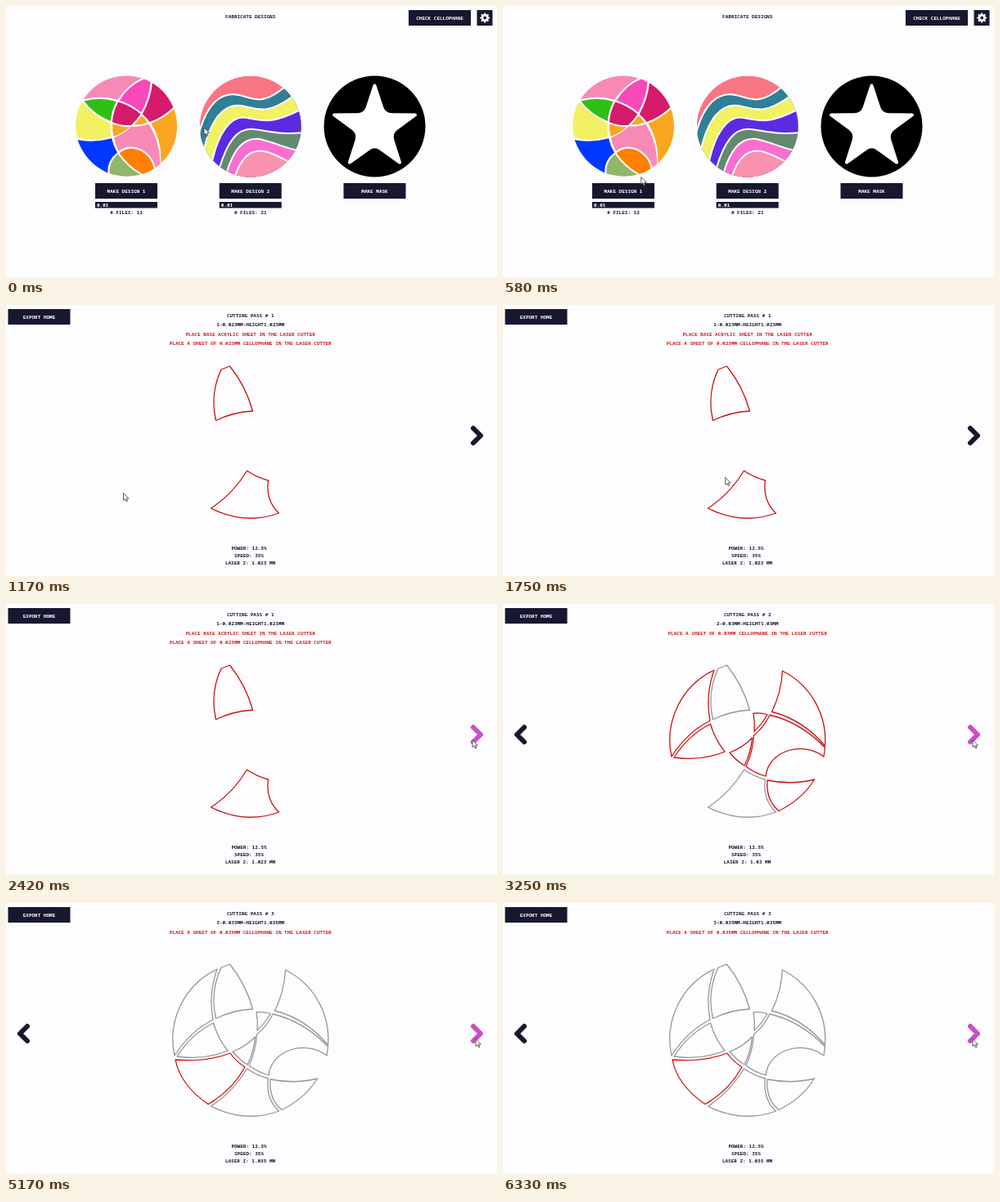
Animation of 600 by 332 pixels, one loop 6410 ms. Source, as an HTML page:

```html
<!DOCTYPE html>
<html lang="en">
<head>
<meta charset="utf-8">
<title>Fabricate designs</title>
<style>
  html, body { margin: 0; width: 100%; height: 100%; overflow: hidden; background: #fdfcfe; }
  svg { display: block; width: 600px; height: 332px; }
  text { font: 600 6px "Noto Sans Mono", "DejaVu Sans Mono", monospace; fill: #17172f; text-anchor: middle; white-space: pre; }
  .light { fill: #fff; }
  .warn { fill: #c8201c; }
  .start { text-anchor: start; }
  .cut { fill: none; stroke: #c81410; stroke-width: 1.3; stroke-linejoin: round; }
  .done { stroke: #989498; }
  .chevron { fill: none; stroke: #17172f; stroke-width: 6; stroke-linecap: round; stroke-linejoin: round; }
</style>
</head>
<body>
<svg id="stage" viewBox="0 0 600 332"></svg>
<script>
const LOOP = 6410;
const DARK = '#17172f', PINK = '#f36cf0', ORCHID = '#c850c8';
const stage = document.getElementById('stage');

const text = (x, y, s, cls = '') => `<text x="${x}" y="${y}" class="${cls}">${s}</text>`;
const rect = (x, y, w, h, extra = '') =>
  `<rect x="${x}" y="${y}" width="${w}" height="${h}" fill="${DARK}" ${extra}/>`;
const button = (x, y, label, id = '') =>
  rect(x, y, 76, 19, id && `id="${id}"`) + text(x + 38, y + 11.8, label, 'light');
const path = (d, attrs) => `<path d="${d}" ${attrs}/>`;
const disc = (x, fill) => `<circle cx="${x}" cy="147.5" r="62" fill="${fill}"/>`;
const clip = (id, x) => `<clipPath id="${id}">${disc(x, '#000')}</clipPath>`;

// Pieces of the first design, grouped by cutting pass: [colour, outline].
const cuts = [
  [
    ['#f74ab8', 'M263,79L273.5,75Q293,99 301.5,130Q278,131 256.5,141.5Q249,109 263,79Z'],
    ['#0038ff', 'M294.5,203Q306,211 320.5,215Q317,239 333.5,255Q292,270 250.5,249Q277,232 294.5,203Z']
  ],
  [
    ['#f78ab5', 'M258,81A95,95 0 0 0 206,187Q225,157 253,143Q247,112 258,81Z'],
    ['#2fc016', 'M209,188Q227,160 253.5,147Q259,166 271,181Q240,193 209,188Z'],
    ['#faa61f', 'M277,182Q293,176 304.5,164Q303,182 295,198Q284,191 277,182Z'],
    ['#faa61f', 'M306,134Q315,133 323,135.5Q316,148 307,156Q308,145 306,134Z'],
    ['#faa61f', 'M341.5,82A95,95 0 0 1 393.5,174Q367,142 328.5,132Q340,109 341.5,82Z'],
    ['#f78ab5', 'M326,136Q364,145 393.5,176L392,187C368,168 325,178 321,211Q307,207 297,199Q305,182 306.5,161Q318,152 326,136Z'],
    ['#92b56a', 'M323,216Q353,222 380.5,215Q366,239 337,253.5Q321,240 323,216Z']
  ],
  [['#f1f163', 'M207,192Q245,195 274,184Q281,194 292,201Q276,230 247,246.5Q213,223 207,192Z']]
];
const uncut = [
  ['#d61a6c', 'M278,75A95,95 0 0 1 338,81Q337,108 325,132Q315,130 305,130.5Q297,99 278,75Z'],
  ['#d61a6c', 'M256.5,145Q278,134 302.5,133Q305,147 304,160Q292,173 274.5,180Q262,165 256.5,145Z'],
  ['#ff8000', 'M324,213C328,182 366,172 391,190Q389,202 382,212Q352,219 324,213Z']
];

const ball = () => clip('ballClip', 147) + '<g clip-path="url(#ballClip)">' + disc(147, '#fff') +
  '<g transform="translate(147 147.5) rotate(43.5) scale(.655) translate(-299 -168)">' +
  [...cuts.flat(), ...uncut].map(([c, d]) => path(d, `fill="${c}"`)).join('') + '</g></g>';

// Wavy bands, each one covering the lower part of the one before.
function waves() {
  const bands = [
    ['#2f7f96', '237,152C247,118 264,105 284,109C304,113 312,123 341,99'],
    ['#f1f163', '242,175C250,140 266,119 287,122C308,126 318,134 350,111'],
    ['#5a2be0', '252,190C259,158 274,133 294,137C314,141 324,145 360,127'],
    ['#64896f', '261,198C270,168 282,149 302,151C322,153 336,158 363,155'],
    ['#f86fd0', '270,203C278,176 290,160 310,163C328,167 340,174 357,177'],
    ['#f892ad', '280,208C288,184 300,175 316,178C328,181 336,186 346,191']
  ];
  return clip('waveClip', 298.7) + '<g clip-path="url(#waveClip)">' + disc(298.7, '#f87585') +
    bands.map(([c, d]) => path(`M230,220L${d}H375V220Z`,
      `fill="${c}" stroke="#fff" stroke-width="2"`)).join('') + '</g>';
}

function star() {
  const at = (r, deg) => [450.5 + r * Math.cos(deg * Math.PI / 180), 149.5 + r * Math.sin(deg * Math.PI / 180)];
  const mix = (a, b, k) => a.map((v, i) => v + (b[i] - v) * k);
  let d = '';
  for (let i = 0; i < 5; i++) {
    const deg = i * 72 - 90;
    const tip = at(52, deg), inner = at(20, deg + 36), next = at(52, deg + 72);
    d += `${i ? 'L' : 'M'}${tip}L${mix(inner, tip, .25)}Q${inner} ${mix(inner, next, .25)}`;
  }
  return disc(450.5, '#000') +
    path(d + 'Z', 'fill="#fff" stroke="#fff" stroke-width="4" stroke-linejoin="round"');
}

function gear() {
  return rect(575.5, 5, 19, 19) +
    '<circle cx="585.2" cy="14.5" r="3.3" fill="none" stroke="#fff" stroke-width="2.8"/>' +
    '<circle cx="585.2" cy="14.5" r="5" fill="none" stroke="#fff" stroke-width="2" pathLength="16" stroke-dasharray="1" stroke-dashoffset=".5"/>';
}

const progress = (x, files) => rect(x, 240, 76, 7.5) +
  text(x + 2, 246, '0.01', 'light start') + text(x + 38, 255.2, `# FILES: ${files}`);

const home = text(298.7, 14.8, 'FABRICATE DESIGNS') +
  button(492, 5, 'CHECK CELLOPHANE') + gear() + ball() + waves() + star() +
  button(109, 217, 'MAKE DESIGN 1', 'make') + button(260.7, 217, 'MAKE DESIGN 2') +
  button(412.5, 217, 'MAKE MASK') + progress(109, 12) + progress(260.7, 21);

function pass(n) {
  const mm = ['0.023', '0.03', '0.035'][n - 1], z = '1' + mm.slice(1);
  const sheet = `PLACE A SHEET OF ${mm}MM CELLOPHANE IN THE LASER CUTTER`;
  const notes = n === 1 ? ['PLACE BASE ACRYLIC SHEET IN THE LASER CUTTER', sheet] : [sheet];
  return button(2.5, 5, 'EXPORT HOME') +
    text(298.7, 14.8, `CUTTING PASS # ${n}`) +
    text(298.7, 26.2, `${n}-${mm}MM-HEIGHT${z}MM`) +
    notes.map((s, i) => text(298.7, 37.6 + i * 11.4, s, 'warn')).join('') +
    cuts.slice(0, n).map((group, i) => group.map(([, d]) =>
      path(d, `class="cut${i < n - 1 ? ' done' : ''}"`)).join('')).join('') +
    ['POWER: 12.5%', 'SPEED: 35%', `LASER Z: ${z} MM`].map((s, i) =>
      text(297 + (i === 2) * 1.5, 300.2 + i * 8.7, s)).join('') +
    (n > 1 ? path('M26,151L17,160L26,169', 'class="chevron"') : '') +
    path('M571,151L580,160L571,169', 'class="chevron next"');
}

const screens = [home, pass(1), pass(2), pass(3)];
stage.innerHTML = '<rect width="600" height="332" fill="#fdfcfe"/>' +
  screens.map(s => `<g class="screen">${s}</g>`).join('') +
  path('M0,0V9L2.1,7.2L3.6,10.4L5,9.7L3.6,6.7H6.4Z',
    'id="cursor" fill="#fff" stroke="#33333b" stroke-width=".8" stroke-linejoin="round"');

const groups = [...stage.querySelectorAll('.screen')];
const nextArrows = [...stage.querySelectorAll('.next')];
const make = document.getElementById('make');
const cursor = document.getElementById('cursor');

const switches = [0, 1170, 3080, 4500];
// time, x, y
const track = [
  [0, 242, 149], [80, 242, 149], [830, 143.5, 230.5], [1420, 143.5, 230.5],
  [2330, 570, 166.5], [2420, 570, 166.5], [2670, 574, 166.5], [LOOP, 574, 166.5]
];

function pointer(t) {
  const i = track.findIndex(p => p[0] > t);
  const [t0, x0, y0] = track[i - 1], [t1, x1, y1] = track[i];
  const k = (t - t0) / (t1 - t0), e = k * k * (3 - 2 * k);
  return [x0 + (x1 - x0) * e, y0 + (y1 - y0) * e];
}

function draw() {
  const t = performance.now() % LOOP;
  const current = switches.filter(s => s <= t).length - 1;
  const [x, y] = pointer(t);
  groups.forEach((g, i) => g.style.display = i === current ? '' : 'none');

  const onMake = x > 109 && x < 185 && y > 217 && y < 236;
  make.setAttribute('fill', onMake ? PINK : DARK);
  make.setAttribute('stroke', onMake ? '#7c3a86' : 'none');
  make.setAttribute('stroke-dasharray', '1 1');
  make.setAttribute('stroke-width', '.8');
  nextArrows.forEach(a => a.style.stroke = x > 566 ? ORCHID : DARK);

  cursor.setAttribute('transform', `translate(${x} ${y})`);
  requestAnimationFrame(draw);
}
draw();
</script>
</body>
</html>
```
